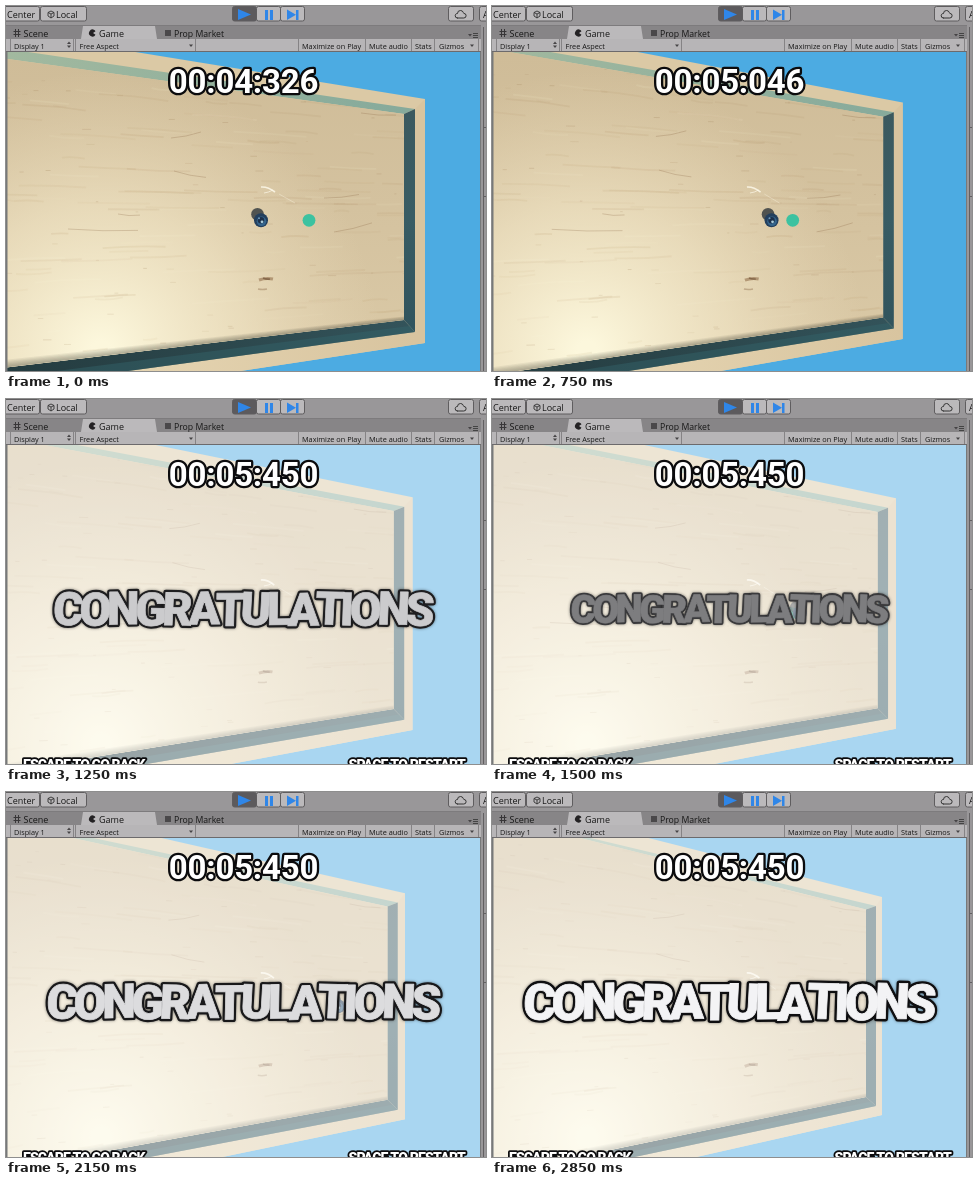
Animation of 480 by 365 pixels, one loop 2900 ms. Source, as an HTML page with a canvas:

```html
<!DOCTYPE html>
<html lang="en">
<head>
<meta charset="utf-8">
<title>Marble board</title>
<style>
html, body { margin: 0; width: 100%; height: 100%; overflow: hidden; background: #a09ea0; }
canvas { display: block; width: 480px; height: 365px; }
</style>
</head>
<body>
<canvas id="stage" width="480" height="365"></canvas>
<script>
const ctx = document.getElementById('stage').getContext('2d');
const LOOP = 2900, STEP = 50, WIN = 1200;
const UI = '"Open Sans", "Noto Sans", sans-serif';
const HEAVY = 'Roboto, "Liberation Sans", sans-serif';

const edgeKeys = [[0, 419], [450, 413], [1100, 408], [1500, 404], [2150, 399], [2450, 396], [2850, 390]];
const clockKeys = [[0, 4326], [450, 4779], [1100, 5358], [WIN, 5450]];
const ballKeys = [[0, 255], [450, 268], [1100, 293], [2850, 358]];

function track(keys, t) {
  for (let i = 1; i < keys.length; i++) {
    const [a, u] = keys[i - 1], [b, v] = keys[i];
    if (t <= b) return u + (v - u) * (t - a) / (b - a);
  }
  return keys[keys.length - 1][1];
}

function seeded(s) {
  return () => (s = (s * 16807) % 2147483647) / 2147483647;
}

const rnd = seeded(77);
const grain = Array.from({ length: 150 }, () => ({
  x: rnd() * 420 - 20, y: 50 + rnd() * 310, len: 12 + rnd() * 65,
  bend: (rnd() - 0.5) * 5, dark: rnd() < 0.7, a: 0.03 + rnd() * 0.07
}));
const flecks = Array.from({ length: 50 }, () => ({
  x: rnd() * 400, y: 60 + rnd() * 280, len: 2 + rnd() * 7, a: 0.08 + rnd() * 0.14
}));
// x, y, length, slope of the stronger marks
const streaks = [[328, 226, 38, -0.24], [168, 165, 32, 0.2], [112, 208, 22, 0.05],
  [62, 223, 70, 0.02], [318, 192, 35, -0.1], [355, 107, 35, 0.06], [165, 132, 30, -0.2]];

function rect(x, y, w, h, c) {
  ctx.fillStyle = c;
  ctx.fillRect(x, y, w, h);
}

function poly(pts, c) {
  ctx.beginPath();
  pts.forEach(([x, y]) => ctx.lineTo(x, y));
  ctx.closePath();
  ctx.fillStyle = c;
  ctx.fill();
}

function disc(x, y, r, c) {
  ctx.beginPath();
  ctx.arc(x, y, r, 0, Math.PI * 2);
  ctx.fillStyle = c;
  ctx.fill();
}

function fade(g, ...stops) {
  stops.forEach((c, i) => g.addColorStop(i / (stops.length - 1), c));
  return g;
}

function label(s, x, y, size, c = '#171717') {
  ctx.font = `500 ${size}px ${UI}`;
  ctx.fillStyle = c;
  ctx.fillText(s, x, y);
}

// Map a floor position to the turned board
function place(x, y, e) {
  const u = x - 260;
  return [260 + u * (1 - (u > 0 ? 0.174 : -0.04) * e), 215 + (y - 215) * (1 - 0.0007 * e * u)];
}

function stroke(x, y, len, dy, bend, c, w, e) {
  const [x0, y0] = place(x, y, e), [x1, y1] = place(x + len, y + dy, e);
  ctx.beginPath();
  ctx.moveTo(x0, y0);
  ctx.quadraticCurveTo((x0 + x1) / 2, (y0 + y1) / 2 + bend, x1, y1);
  ctx.strokeStyle = c;
  ctx.lineWidth = w;
  ctx.stroke();
}

function wood(e) {
  rect(0, 46, 475, 319, fade(ctx.createLinearGradient(0, 50, 0, 350), '#cfbc98', '#d4c29f', '#dac9a6'));
  rect(0, 46, 475, 319, fade(ctx.createRadialGradient(95, 345, 10, 95, 345, 280),
    'rgba(252,247,220,1)', 'rgba(244,233,202,.6)', 'rgba(236,221,188,0)'));
  for (const g of grain) {
    const c = g.dark ? `rgba(150,112,66,${g.a})` : `rgba(255,246,220,${g.a})`;
    stroke(g.x, g.y, g.len, (215 - g.y) * g.len * 0.0008, g.bend, c, 1.8, e);
  }
  for (const f of flecks) stroke(f.x, f.y, f.len, 0, 0, `rgba(130,92,52,${f.a})`, 0.8, e);
  for (const [x, y, len, s] of streaks) stroke(x, y, len, len * s, 2, 'rgba(125,90,55,.24)', 1, e);
  stroke(255, 181, 14, 5, -3, 'rgba(255,252,238,.8)', 1.6, e);
  stroke(258, 187, 9, -3, 1, 'rgba(255,252,238,.65)', 1, e);
  stroke(273, 188, 16, 9, 0, 'rgba(255,250,232,.35)', 1, e);
  stroke(253, 274, 14, -1, -2, 'rgba(120,78,42,.45)', 3, e);
  stroke(257, 272, 7, 1, 1, 'rgba(90,58,32,.5)', 1.5, e);
  stroke(252, 283, 9, 0, 1, 'rgba(120,85,52,.35)', 1.5, e);
}

// Left ends of a ring's long sides, whose slopes grow as the board turns
function ring(x, top, bottom, far, near, e) {
  const dist = 1 / (1 / far + (1 / near - 1 / far) * e), vy = 219 + e;
  const left = y => [-20, y + (y - vy) / dist * (x + 20)];
  return [left(top), [x, top], [x, bottom], left(bottom)];
}

function board(t) {
  const e = (419 - track(edgeKeys, t)) / 29;
  const outer = ring(419 - 29 * e, 93 + 12 * e, 337 - 14 * e, 777, 455, e);
  const inner = ring(409 - 25 * e, 103 + 11 * e, 326 - 12 * e, 787, 445, e);
  const floor = ring(398 - 24 * e, 108 + 9.5 * e, 314 - 9 * e, 798, 410, e);

  rect(0, 46, 475, 319, '#4cabe2');
  poly(outer, '#dbc9a5');
  poly([outer[1], outer[2], inner[2], inner[1]], '#d8c49f');
  poly([outer[2], outer[3], inner[3], inner[2]], fade(ctx.createLinearGradient(100, 0, 410, 0), '#e6d6b3', '#d8c49f'));
  poly([inner[0], inner[1], floor[1], floor[0]], fade(ctx.createLinearGradient(0, 0, 400, 0), '#a2b99f', '#86aa9b'));
  poly([inner[1], inner[2], floor[2], floor[1]], fade(ctx.createLinearGradient(0, 105, 0, 320), '#3b595f', '#385c64', '#31545d'));
  poly([inner[2], inner[3], floor[3], floor[2]], fade(ctx.createLinearGradient(0, 0, 400, 0), '#243c40', '#2b464b', '#33535a'));
  // Lighter foot of the near wall
  const mid = i => [(inner[i][0] + floor[i][0]) / 2, (inner[i][1] + floor[i][1]) / 2];
  poly([inner[2], inner[3], mid(3), mid(2)], 'rgba(52,100,106,.45)');

  ctx.save();
  ctx.beginPath();
  floor.forEach(([x, y]) => ctx.lineTo(x, y));
  ctx.clip();
  wood(e);
  const [fx, fy] = floor[2], [lx, ly] = floor[3];
  for (let i = 1; i < 7; i++) poly([[fx, fy], [fx, fy - 0.6 * i], [lx, ly - 1.3 * i], [lx, ly]], 'rgba(70,68,60,.08)');
  ctx.restore();

  disc(303 - 8 * e, 214.3, 6.4, '#3cc2a0');
  ball(track(ballKeys, t), 214.3);
}

function ball(x, y) {
  disc(x - 3.5, y - 6, 6.3, 'rgba(45,52,58,.8)');
  disc(x, y, 7, '#233f5d');
  disc(x + 0.5, y + 1, 4.8, '#34658d');
  disc(x, y, 3.2, '#1d304a');
  disc(x + 1, y + 1.5, 1.4, '#a9cbd9');
  disc(x - 2, y - 2, 1, '#7099b9');
}

function outlined(s, x, y, font, space, width, fill = '#fff', edge = '#0b0b0d') {
  ctx.font = font;
  ctx.letterSpacing = space + 'px';
  ctx.lineJoin = 'round';
  ctx.strokeStyle = edge;
  ctx.lineWidth = width;
  ctx.strokeText(s, x, y);
  ctx.fillStyle = fill;
  ctx.fillText(s, x, y);
  ctx.letterSpacing = '0px';
}

function clock(t) {
  const ms = Math.round(track(clockKeys, t));
  const pad = (n, k) => String(n).padStart(k, '0');
  ctx.textAlign = 'center';
  outlined(`00:${pad(Math.floor(ms / 1000), 2)}:${pad(ms % 1000, 3)}`, 237.5, 86.5, `700 33px ${HEAVY}`, -0.2, 4.6);
  ctx.textAlign = 'left';
}

function cheer(t) {
  const word = 'CONGRATULATIONS', gap = -4.5;
  const wave = Math.pow((1 - Math.cos((t - 1500) / 950 * Math.PI * 2)) / 2, 0.75);
  const tone = Math.round(125 + 124 * wave), ink = Math.round(58 - 45 * wave);
  const fill = `rgb(${tone},${tone},${tone + 2})`, edge = `rgb(${ink},${ink},${ink + 2})`;
  ctx.save();
  ctx.translate(238, 210);
  ctx.scale(0.77 + 0.24 * wave, 0.77 + 0.24 * wave);
  ctx.transform(1, 0, -0.03, 1, 0, 0);
  ctx.font = `900 50px ${HEAVY}`;
  ctx.lineJoin = 'round';
  const sizes = [...word].map(c => ctx.measureText(c).width + gap);
  const total = sizes.reduce((a, b) => a + b, 0);
  for (const pass of [0, 1]) {
    let x = -total / 2;
    [...word].forEach((c, i) => {
      ctx.save();
      ctx.translate(x + sizes[i] / 2, Math.sin(i * 2.3) * 0.8);
      ctx.rotate(Math.sin(i * 1.9 + 1) * 0.025);
      ctx.textAlign = 'center';
      ctx.lineWidth = pass ? 0.8 : 5.5;
      ctx.strokeStyle = pass ? fill : edge;
      ctx.fillStyle = fill;
      if (!pass) {
        ctx.shadowColor = 'rgba(0,0,0,.5)';
        ctx.shadowBlur = 3;
      }
      ctx.strokeText(c, 0, 17.5);
      if (pass) ctx.fillText(c, 0, 17.5);
      ctx.restore();
      x += sizes[i];
    });
  }
  ctx.restore();
}

function hints() {
  const font = `900 14px ${HEAVY}`;
  outlined('ESCAPE TO GO BACK', 17, 370.5, font, -0.9, 3.5);
  ctx.textAlign = 'right';
  outlined('SPACE TO RESTART', 459, 370.5, font, -0.8, 3.5);
  ctx.textAlign = 'left';
}

function button(x, w, c) {
  ctx.beginPath();
  ctx.roundRect(x + 0.5, 0.5, w - 1, 14.5, 2);
  ctx.fillStyle = c;
  ctx.fill();
  ctx.strokeStyle = '#5f5d5f';
  ctx.lineWidth = 1;
  ctx.stroke();
}

function arrow(x, y) {
  poly([[x - 2, y], [x + 2, y], [x, y + 2.5]], '#454345');
}

function chrome() {
  const face = '#bbb9bb';
  rect(0, 0, 480, 46, '#999799');
  rect(0, 19, 475, 14, '#878587');
  rect(0, 19, 475, 1, '#7d7b7d');
  button(-6, 40, face);
  button(34, 47, face);
  label('Center', 1, 11.5, 9);
  label('Local', 50, 11.5, 9);
  ctx.strokeStyle = '#333';
  ctx.lineWidth = 0.9;
  ctx.beginPath();
  [[45, 5], [48, 6.5], [48, 10], [45, 12], [42, 10], [42, 6.5]].forEach(p => ctx.lineTo(...p));
  ctx.closePath();
  ctx.moveTo(42, 6.5); ctx.lineTo(45, 8); ctx.lineTo(48, 6.5);
  ctx.moveTo(45, 8); ctx.lineTo(45, 12);
  ctx.stroke();

  const blue = '#2f86e8';
  button(226, 25, '#5c5a5d');
  button(250, 25, face);
  button(274, 25, face);
  poly([[232, 3], [245, 8.5], [232, 14]], blue);
  rect(259, 4, 3, 10, blue);
  rect(264, 4, 3, 10, blue);
  poly([[281, 3.5], [290, 8.7], [281, 14]], blue);
  rect(290, 4, 2.5, 10, blue);

  button(442, 26, face);
  ctx.beginPath();
  ctx.moveTo(451, 12);
  ctx.arc(451.5, 9.7, 2.3, Math.PI / 2, Math.PI * 1.4);
  ctx.arc(454.5, 7.5, 3, Math.PI, Math.PI * 1.9);
  ctx.arc(457.8, 9.7, 2.3, -Math.PI / 2, Math.PI / 2);
  ctx.closePath();
  ctx.strokeStyle = '#333';
  ctx.stroke();
  button(473, 20, face);
  label('A', 477, 11.5, 9);

  poly([[75, 33], [77, 20], [149, 20], [151, 33]], face);
  label('Scene', 17.5, 31, 9);
  label('Game', 93, 31, 9);
  label('Prop Market', 168, 31, 8.7);
  for (const d of [0, 3]) {
    rect(9 + d, 23, 1, 8, '#383638');
    rect(7.5, 25 + d, 7, 1, '#383638');
  }
  ctx.beginPath();
  ctx.moveTo(87, 27);
  ctx.arc(86.5, 27, 3.5, 0.55, Math.PI * 2 - 0.55);
  ctx.fillStyle = '#242224';
  ctx.fill();
  rect(159, 24, 6, 6, '#4a484a');
  arrow(464, 28);
  for (const y of [27, 29, 31]) rect(467, y, 5, 1, '#444');

  rect(0, 33, 475, 12, '#b7b5b7');
  rect(0, 45, 475, 1, '#6c6a6c');
  for (const x of [4, 67, 69, 189, 292, 359, 405, 428, 472]) rect(x, 33, 1, 12, '#858385');
  [['Display 1', 8], ['Free Aspect', 73.5], ['Maximize on Play', 296], ['Mute audio', 363],
    ['Stats', 409], ['Gizmos', 433]].forEach(([s, x]) => label(s, x, 42.5, 7.3));
  arrow(185, 38.5);
  arrow(466, 38.5);
  poly([[61, 38], [65, 38], [63, 35.5]], '#454345');
  arrow(63, 39.5);
}

function sides() {
  rect(0, 46, 1.5, 319, '#77797a');
  rect(474, 46, 1, 319, '#77797a');
  rect(475, 19, 5, 346, '#999799');
  rect(477, 21, 1, 344, '#626062');
  rect(478, 121, 2, 1, '#626062');
  rect(478, 190, 2, 1, '#626062');
}

function draw(t) {
  ctx.clearRect(0, 0, 480, 365);
  board(t);
  if (t >= WIN) rect(0, 46, 475, 319, 'rgba(255,255,255,.52)');
  chrome();
  sides();
  clock(t);
  if (t >= WIN) {
    cheer(t);
    hints();
  }
}

const start = performance.now();
function tick() {
  const t = (performance.now() - start) % LOOP;
  draw(Math.floor(t / STEP) * STEP);
  requestAnimationFrame(tick);
}
tick();
</script>
</body>
</html>
```
